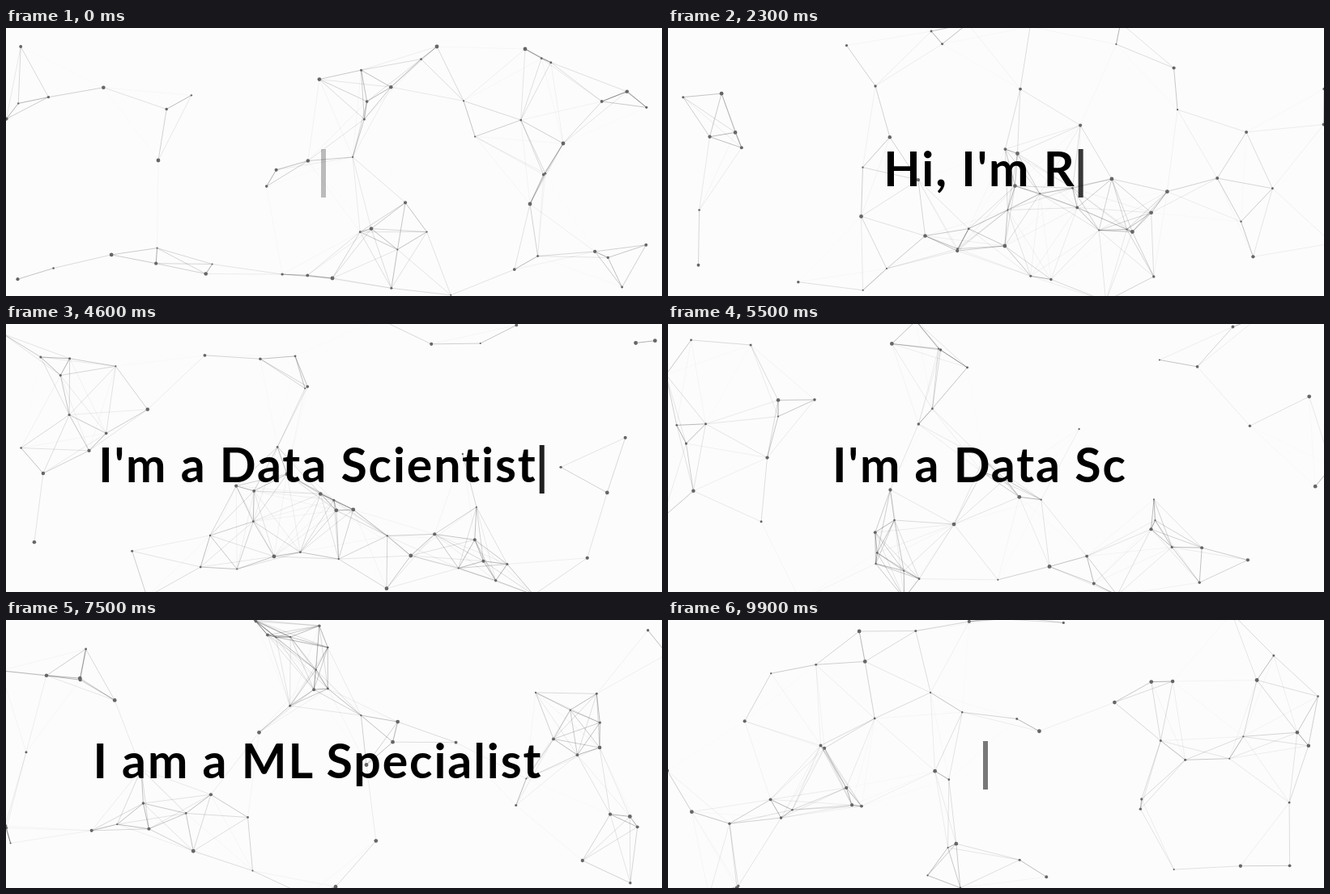
Animation of 810x332 px, one loop 10 s. Source, as an HTML page with a canvas:

```html
<!DOCTYPE html>
<html lang="en">
<head>
<meta charset="utf-8">
<style>
html, body { margin: 0; width: 100%; height: 100%; overflow: hidden; background: #fcfcfc; }
canvas, svg { position: absolute; left: 0; top: 0; display: block; }
text { font: 700 59px Lato, "Open Sans", sans-serif; white-space: pre; }
</style>
</head>
<body>
<canvas id="net" width="810" height="332"></canvas>
<svg width="810" height="332" viewBox="0 0 810 332">
  <text id="line" y="195.5"></text>
  <rect id="bar" y="150" width="6" height="60"/>
</svg>
<script>
const W = 810, H = 332, LOOP = 10000, STEP = 100;
const COUNT = 56, REACH = 118, MARGIN = 10, SPEED = 75;

// Seeded random numbers between two limits
let seed = 71;
function rnd(min, max) {
  seed = (seed * 16807) % 2147483647;
  return min + (max - min) * seed / 2147483647;
}

// The largest dots: x, y and speed in px/s
const dots = [
  [188, 164, -53, -36], [403, 310, 5.6, -17.4], [641, 26, -10.7, 76.8],
  [532, 23, -43.7, 57.6], [688, 143, -60.9, 19.1], [647, 218, -32, 15]
].map(([x, y, vx, vy]) => ({ x, y, vx, vy, r: 2.4 }));
while (dots.length < COUNT) {
  dots.push({
    x: rnd(0, W), y: rnd(0, H),
    vx: rnd(-SPEED, SPEED), vy: rnd(-SPEED, SPEED),
    r: rnd(1, 2.4)
  });
}

// Drift straight on; a dot that leaves comes back at the far edge
function move(p) {
  const q = { ...p, x: p.x + p.vx * STEP / 1000, y: p.y + p.vy * STEP / 1000 };
  if (q.x < -MARGIN || q.x > W + MARGIN) {
    q.x = q.x < 0 ? W + MARGIN : -MARGIN;
    q.y = rnd(0, H);
  } else if (q.y < -MARGIN || q.y > H + MARGIN) {
    q.y = q.y < 0 ? H + MARGIN : -MARGIN;
    q.x = rnd(0, W);
  }
  return q;
}

const states = [dots];
while (states.length < LOOP / STEP) states.push(states.at(-1).map(move));

const ctx = document.getElementById("net").getContext("2d");
function drawNet(list) {
  ctx.clearRect(0, 0, W, H);
  ctx.lineWidth = 0.9;
  list.forEach((a, i) => {
    for (const b of list.slice(i + 1)) {
      const d = Math.hypot(a.x - b.x, a.y - b.y);
      if (d >= REACH) continue;
      ctx.strokeStyle = `rgba(0,0,0,${0.42 * (1 - d / REACH)})`;
      ctx.beginPath();
      ctx.moveTo(a.x, a.y);
      ctx.lineTo(b.x, b.y);
      ctx.stroke();
    }
  });
  ctx.fillStyle = "#666";
  for (const p of list) {
    ctx.beginPath();
    ctx.arc(p.x, p.y, p.r, 0, 2 * Math.PI);
    ctx.fill();
  }
}

// Phrases with the number of letters kept when erasing
const phrases = [["Hi, I'm Ralit", 0], ["I'm a Data Scientist", 1], ["I am a ML Specialist", 0]];
const START = 60, TYPE = 34, ERASE = 65, HOLD = 1495;

function typed(t) {
  let start = START, from = 0;
  for (const [text, keep] of phrases) {
    const full = start + (text.length - from) * TYPE;
    const erase = full + HOLD;
    const end = erase + (text.length - keep) * ERASE;
    if (t < full) return text.slice(0, from + Math.max(0, Math.floor((t - start) / TYPE)));
    if (t < erase) return text;
    if (t < end) return text.slice(0, text.length - Math.floor((t - erase) / ERASE));
    start = end;
    from = keep;
  }
  return "";
}

// The bar fades in over half its 700 ms cycle, then drops out
function blink(step) {
  const phase = (step + 1) % 7;
  return phase < 6 ? Math.min(0.87, phase * 0.26) : 0;
}

const line = document.getElementById("line"), bar = document.getElementById("bar");
const MID = 392, BAR_SPACE = 16, SPACING = 1.93;
line.style.letterSpacing = SPACING + "px";

function drawText(step) {
  const text = typed(step * STEP);
  line.textContent = text;
  const width = text ? line.getComputedTextLength() - SPACING : 0;
  const left = MID - (width + BAR_SPACE) / 2;
  line.setAttribute("x", left);
  bar.setAttribute("x", left + width + 5);
  bar.setAttribute("opacity", blink(step));
}

const begin = performance.now();
let shown = -1;
function tick() {
  const step = Math.floor(((performance.now() - begin) % LOOP) / STEP);
  if (step !== shown) {
    shown = step;
    drawNet(states[step]);
    drawText(step);
  }
  requestAnimationFrame(tick);
}
tick();
</script>
</body>
</html>
```
